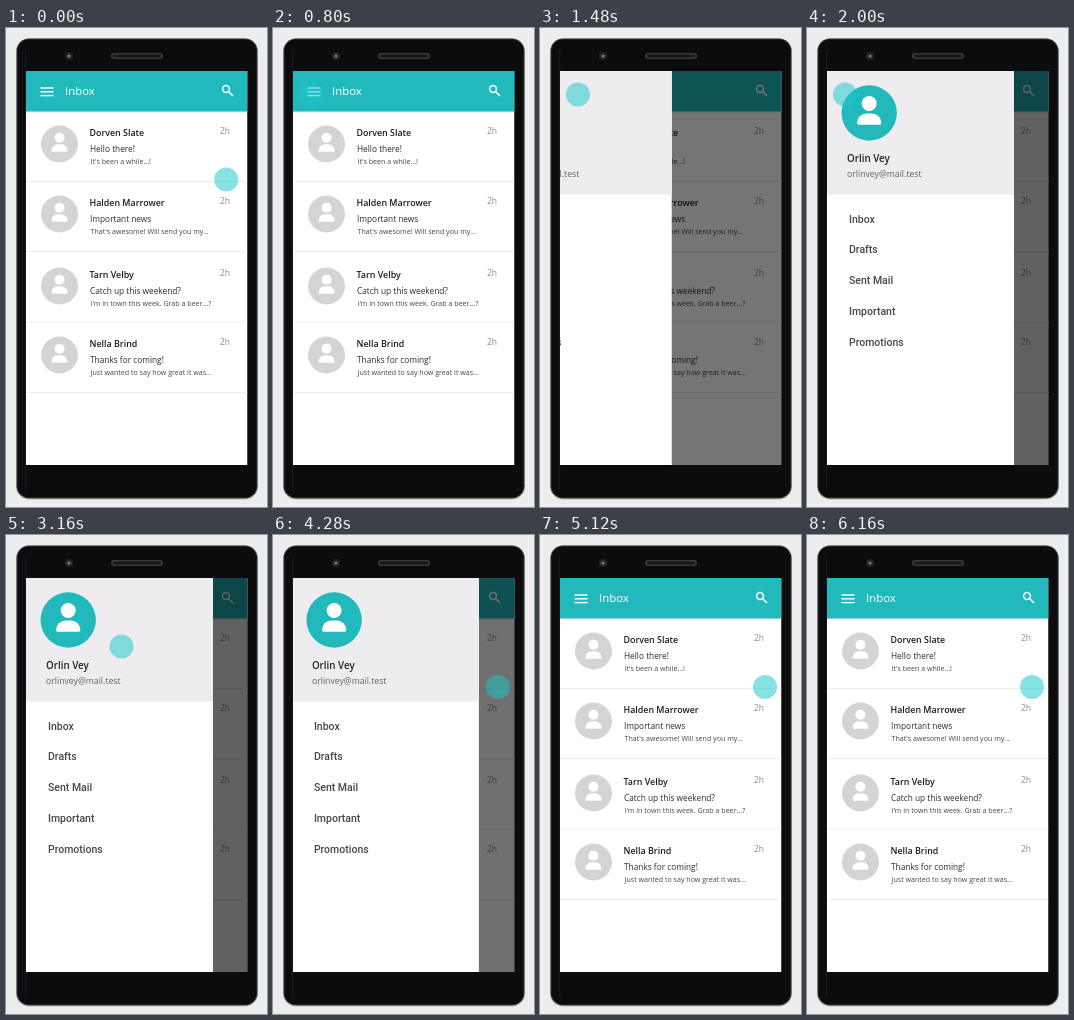
These frames come from a looping animation (261 by 479 pixels, 6520 ms). An HTML page with a canvas:

```html
<!DOCTYPE html>
<html lang="en">
<head>
<meta charset="utf-8">
<title>Inbox drawer</title>
<style>
html, body { margin: 0; width: 100%; height: 100%; overflow: hidden; background: #edecef; }
canvas { display: block; width: 261px; height: 479px; }
</style>
</head>
<body>
<canvas id="stage"></canvas>
<script>
const WIDTH = 261, HEIGHT = 479, LOOP = 6520;
const SCREEN = { x: 20, y: 43, w: 221.5, h: 394 };
const DRAWER_WIDTH = 187, DIM = 0.62;
const TEAL = '#22b9bc';
const SANS = '"Open Sans", sans-serif', ROBOTO = 'Roboto, sans-serif';

const mails = [
  { dy: 0, name: 'Dorven Slate', subject: 'Hello there!', preview: "It's been a while...!" },
  { dy: 70, name: 'Halden Marrower', subject: 'Important news', preview: "That's awesome! Will send you my..." },
  { dy: 142, name: 'Tarn Velby', subject: 'Catch up this weekend?', preview: "I'm in town this week. Grab a beer...?" },
  { dy: 211, name: 'Nella Brind', subject: 'Thanks for coming!', preview: 'Just wanted to say how great it was...' }
];
const dividers = [153.5, 223.5, 294, 364.5];
const menu = ['Inbox', 'Drafts', 'Sent Mail', 'Important', 'Promotions'];

const canvas = document.getElementById('stage');
const ctx = canvas.getContext('2d');
const ratio = window.devicePixelRatio || 1;
canvas.width = WIDTH * ratio;
canvas.height = HEIGHT * ratio;

// Sine ease-in-out between two times, clamped to 0..1.
function ease(t, start, end) {
  const p = Math.min(1, Math.max(0, (t - start) / (end - start)));
  return (1 - Math.cos(Math.PI * p)) / 2;
}

function rect(x, y, w, h, color) {
  ctx.fillStyle = color;
  ctx.fillRect(x, y, w, h);
}

function roundRect(x, y, w, h, r, color) {
  ctx.beginPath();
  ctx.roundRect(x, y, w, h, r);
  ctx.fillStyle = color;
  ctx.fill();
}

function circle(x, y, r, color) {
  ctx.beginPath();
  ctx.arc(x, y, r, 0, Math.PI * 2);
  ctx.fillStyle = color;
  ctx.fill();
}

function text(str, x, y, size, color, weight = 400, family = SANS) {
  ctx.font = `${weight} ${size}px ${family}`;
  ctx.fillStyle = color;
  ctx.fillText(str, x, y);
}

function avatar(x, y, r, color) {
  circle(x, y, r, color);
  circle(x, y - r * 0.34, r * 0.27, '#fff');
  roundRect(x - r * 0.44, y + r * 0.02, r * 0.88, r * 0.4, [r * 0.36, r * 0.36, r * 0.06, r * 0.06], '#fff');
}

function drawPhone() {
  rect(0, 0, WIDTH, HEIGHT, '#edecef');
  roundRect(10, 10.5, 242, 461, 13, '#b9b8bc');
  roundRect(10.5, 10.5, 241, 460, 12.5, '#36363a');
  roundRect(11.5, 11.5, 239, 458, 11.5, '#0c0c0f');
  rect(19.5, 22, 0.7, 440, '#252528');
  circle(63, 28, 4, '#242428');
  circle(63, 28, 1.6, '#77777e');
  roundRect(105, 25, 52, 6, 3, '#38383c');
  roundRect(107, 26.5, 48, 3, 1.5, '#17171a');
}

function drawInbox() {
  rect(SCREEN.x, SCREEN.y, SCREEN.w, SCREEN.h, '#fff');
  rect(SCREEN.x, 83.5, SCREEN.w, 1, '#e3e8e9');
  rect(SCREEN.x, SCREEN.y, SCREEN.w, 40.5, TEAL);
  for (const y of [60, 63.8, 67.6]) rect(34.5, y - 0.7, 13, 1.4, '#fff');
  text('Inbox', 59, 67, 11.4, '#fff');

  ctx.strokeStyle = '#fff';
  ctx.lineWidth = 1.5;
  ctx.beginPath();
  ctx.arc(220, 61, 3.4, 0, Math.PI * 2);
  ctx.moveTo(222.5, 63.5);
  ctx.lineTo(227, 68);
  ctx.stroke();

  for (const { dy, name, subject, preview } of mails) {
    avatar(53.5, 116 + dy, 18.5, '#d6d3d6');
    text(name, 83.5, 107.5 + dy, 8.9, '#1c1c1e', 600);
    text(subject, 84, 123.7 + dy, 8.3, '#2c2c2e');
    text(preview, 84.5, 136 + dy, 7.1, '#48484a');
    text('2h', 214, 105.7 + dy, 8.5, '#8a8a8c');
  }
  for (const y of dividers) rect(SCREEN.x, y - 0.5, SCREEN.w, 1, '#ececee');
}

function drawDrawer(open) {
  if (open <= 0) return;
  ctx.save();
  ctx.translate(SCREEN.x - DRAWER_WIDTH * (1 - open), 0);
  rect(0, SCREEN.y, DRAWER_WIDTH, SCREEN.h, '#fff');
  rect(0, SCREEN.y, DRAWER_WIDTH, 123.5, '#eeecef');
  avatar(42.2, 85, 27.7, TEAL);
  text('Orlin Vey', 20, 134, 9.8, '#222224', 600);
  text('orlinvey@mail.test', 20, 149, 8.7, '#626264');
  menu.forEach((label, i) => text(label, 22, 194.7 + i * 30.75, 10.5, '#48484a', 500, ROBOTO));
  ctx.restore();
}

// The pointer travels on a shallow arc: 0 is the menu icon, 1 the resting spot.
function drawPointer(t) {
  const p = t < 2000 ? 1 - ease(t, -90, 800) : ease(t, 2680, 3760);
  const x = 38 + 187 * p;
  const y = 152 - 85.5 * Math.pow(1 - p, 1.4);
  circle(x, y, 12, 'rgba(25, 201, 201, 0.52)');
}

function draw(t) {
  const dim = DIM * (ease(t, 1020, 1620) - ease(t, 4190, 4650));
  const open = ease(t, 1256, 1656) - ease(t, 4260, 4690);

  ctx.setTransform(ratio, 0, 0, ratio, 0, 0);
  drawPhone();
  ctx.save();
  ctx.beginPath();
  ctx.rect(SCREEN.x, SCREEN.y, SCREEN.w, SCREEN.h);
  ctx.clip();
  drawInbox();
  rect(SCREEN.x, SCREEN.y, SCREEN.w, SCREEN.h, `rgba(0, 0, 0, ${dim.toFixed(4)})`);
  drawDrawer(open);
  ctx.restore();
  drawPointer(t);
}

const startTime = performance.now();
function tick() {
  draw((performance.now() - startTime) % LOOP);
  requestAnimationFrame(tick);
}
tick();
</script>
</body>
</html>
```
